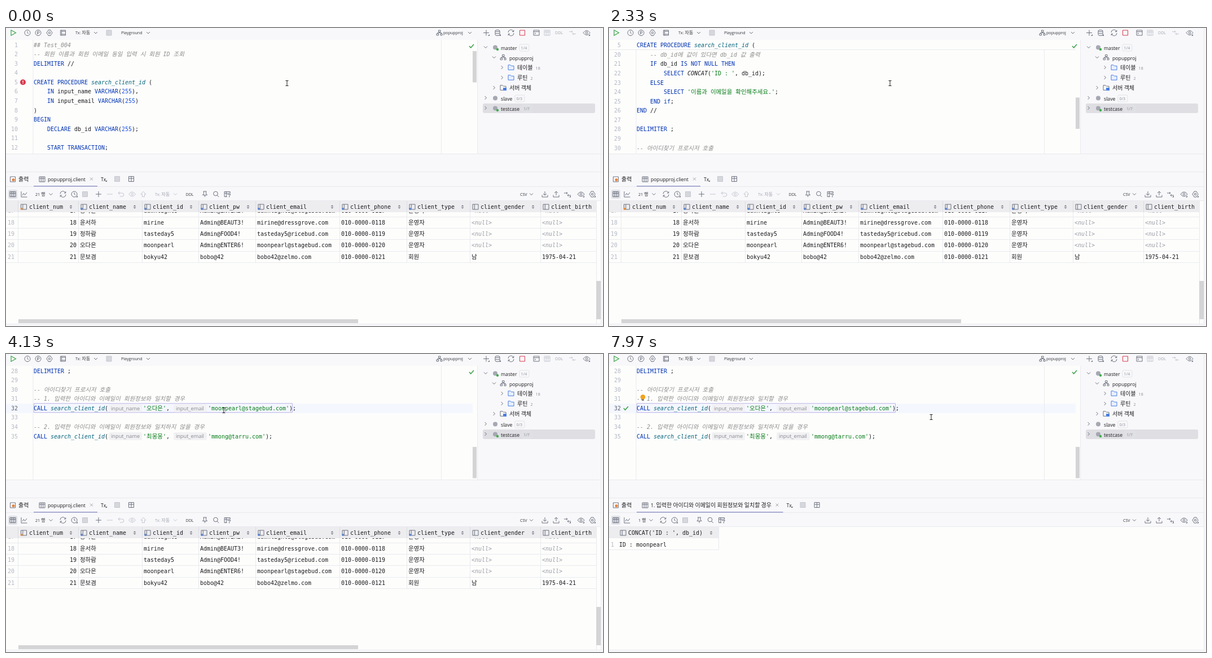
An HTML page with a canvas for the animation above (8 s loop, 1058 by 529 pixels).

```html
<!DOCTYPE html>
<html lang="ko">
<head>
<meta charset="utf-8">
<style>
html, body { margin: 0; width: 100%; height: 100%; overflow: hidden; background: #fdfdfc; }
canvas { display: block; }
</style>
</head>
<body>
<canvas id="stage" width="1058" height="529"></canvas>
<script>
const ctx = document.getElementById('stage').getContext('2d');
const LOOP = 8000, LINE = 16.57, CLICK = 4400, BULB = 5000, POPUP = [5800, 6850], RESULT = 7000;
const WHITE = '#fdfdfc', PANEL = '#f8f8fa', RULE = '#e9eaee', INK = '#1c1c20', GREY = '#6c707e', PALE = '#c4c7d0';
const THUMB = '#d4d4d6', GREEN = '#3fa34d', MONO = '"DejaVu Sans Mono", monospace', UI = '"Open Sans", sans-serif';

const code = `## Test_004
-- 회원 이름과 회원 이메일 동일 입력 시 회원 ID 조회
DELIMITER //

CREATE PROCEDURE search_client_id (
    IN input_name VARCHAR(255),
    IN input_email VARCHAR(255)
)
BEGIN
    DECLARE db_id VARCHAR(255);

    START TRANSACTION;

    -- 입력받은 이름과 이메일이 회원정보와 같을 경우 db_id에 client_id 값 저장
    SELECT client_id
    INTO db_id
    FROM client
    WHERE client_name = input_name AND client_email = input_email;

    -- db_id에 값이 있다면 db_id 값 출력
    IF db_id IS NOT NULL THEN
        SELECT CONCAT('ID : ', db_id);
    ELSE
        SELECT '이름과 이메일을 확인해주세요.';
    END if;
END //

DELIMITER ;

-- 아이디찾기 프로시저 호출
-- 1. 입력한 아이디와 이메일이 회원정보와 일치할 경우
CALL search_client_id({input_name}'오다은', {input_email}'moonpearl@stagebud.com');

-- 2. 입력한 아이디와 이메일이 회원정보와 일치하지 않을 경우
CALL search_client_id({input_name}'최몽몽', {input_email}'mmong@tarru.com');`.split('\n');

const columns = [[21, 'client_num'], [128, 'client_name'], [241, 'client_id'], [341, 'client_pw'], [442, 'client_email'],
  [591, 'client_phone'], [710, 'client_type'], [822, 'client_gender'], [947, 'client_birth']];
const rows = [
  ['17', '송가온', 'dawnlights', 'Admin@ENTER2!', 'dawnlights@stagebud.com', '010-0000-0117', '운영자', '<null>', '<null>'],
  ['18', '윤서하', 'mirine', 'Admin@BEAUT3!', 'mirine@dressgrove.com', '010-0000-0118', '운영자', '<null>', '<null>'],
  ['19', '정하람', 'tasteday5', 'Admin@FOOD4!', 'tasteday5@ricebud.com', '010-0000-0119', '운영자', '<null>', '<null>'],
  ['20', '오다은', 'moonpearl', 'Admin@ENTER6!', 'moonpearl@stagebud.com', '010-0000-0120', '운영자', '<null>', '<null>'],
  ['21', '문보겸', 'bokyu42', 'bobo@42', 'bobo42@zelmo.com', '010-0000-0121', '회원', '남', '1975-04-21']];

const ring = r => `M${r} 0A${r} ${r} 0 1 1-${r} 0A${r} ${r} 0 1 1 ${r} 0`;
const shapes = {
  play: 'M-4-4.8L4.5 0L-4 4.8Z',
  clock: ring(5) + 'M0-3V0L2 1.5',
  param: ring(5) + 'M-1.3 2.8V-2.5H.5A1.5 1.5 0 0 1 .5.6H-1.3',
  gear: 'M-2-5H2L3-3L5.2 0L3 3L2 5H-2L-3 3L-5.2 0L-3-3Z' + ring(1.7),
  frame: 'M-4.5-4.5H4.5V4.5H-4.5ZM-2.5-4.5V4.5M-2.5-2.5H4.5M-2.5 2.5H4.5',
  layout: 'M-4.5-4.5H4.5V4.5H-4.5ZM0-4.5V4.5M-4.5-1H4.5',
  table: 'M-5-4.5H5V4.5H-5ZM-5-1.5H5M-1.7-4.5V4.5M1.7-4.5V4.5',
  column: 'M-5-4.5H5V4.5H-5ZM-1.7-4.5V4.5',
  refresh: 'M-5-.5A4.7 4.7 0 0 1 4-2.5M4.8-4.8V-2H2M5 .5A4.7 4.7 0 0 1-4 2.5M-4.8 4.8V2H-2',
  down: 'M-3-1.5L0 1.5L3-1.5',
  right: 'M-1.5-3L1.5 0L-1.5 3',
  plus: 'M-5 0H5M0-5V5',
  minus: 'M-5 0H5',
  undo: 'M-2-4.5L-5-2L-2 .5M-5-2H2A2.8 2.8 0 0 1 2 4H-2',
  eye: 'M-6 0Q0-8 6 0Q0 8-6 0' + ring(1.8),
  up: 'M0-4.8L4.5 0H2V4.5H-2V0H-4.5Z',
  pin: 'M-3-5H3M-2-5V-1L-4 1.5H4L2-1V-5M0 1.5V5',
  search: 'M3-1A3.8 3.8 0 1 1-4.6-1A3.8 3.8 0 1 1 3-1M2 2L5 5',
  filter: 'M5-1V-4.5H-5V4.5H-.5M-5-1.7H5M-1.7-4.5V4.5M0 .5H6L3.7 2.8V5.5',
  load: 'M0-5V2M-3-1L0 2L3-1M-5 1.5V5H5V1.5',
  save: 'M0 2V-5M-3-2L0-5L3-2M-5 1.5V5H5V1.5',
  compare: 'M-6-2H0M-2-4L0-2L-2 0M6 2H0M2 0L0 2L2 4',
  db: 'M-4-3.5A4 1.5 0 0 1 4-3.5A4 1.5 0 0 1-4-3.5V3.5A4 1.5 0 0 0 4 3.5V-3.5M-4 0A4 1.5 0 0 0 4 0',
  console: 'M-5-4.5H5V4.5H-5ZM-5-2H5M-3 0L-1.5 1.2L-3 2.5',
  folder: 'M-5-4.3H-1L.5-2.7H5V4.3H-5Z',
  schema: 'M-1.5-4.5H2V-1.5H-1.5ZM-5 1.5H-1.5V4.5H-5ZM2 1.5H5V4.5H2ZM.3-1.5V0M-3.2 1.5V0H3.5V1.5',
  chart: 'M-5-5V5H5.5M-3 2L-.7-1.5L1.5 1.5L5-3',
  square: 'M-4.5-4.5H4.5V4.5H-4.5Z',
  sort: 'M-2-1L0-3L2-1ZM-2 1L0 3L2 1Z',
  check: 'M-4 0L-1.3 3L4-3',
  close: 'M-2.5-2.5L2.5 2.5M2.5-2.5L-2.5 2.5',
  corner: 'M3 5.5H6V2.5Z',
  beam: 'M-2.5-4.5H2.5M0-4.5V4.5M-2.5 4.5H2.5'
};
for (const k in shapes) shapes[k] = new Path2D(shapes[k]);

function icon(name, x, y, color = GREY, fill, width = 1) {
  ctx.save();
  ctx.translate(x, y);
  if (fill) { ctx.fillStyle = fill; ctx.fill(shapes[name]); }
  ctx.strokeStyle = color;
  ctx.lineWidth = width;
  ctx.stroke(shapes[name]);
  ctx.restore();
}
const corner = (x, y) => { ctx.save(); ctx.translate(x, y); ctx.fillStyle = GREY; ctx.fill(shapes.corner); ctx.restore(); };
function rect(x, y, w, h, color) { ctx.fillStyle = color; ctx.fillRect(x, y, w, h); }
function dot(x, y, r, color) { ctx.fillStyle = color; ctx.beginPath(); ctx.arc(x, y, r, 0, 7); ctx.fill(); }
function round(x, y, w, h, r, fill, stroke) {
  ctx.beginPath();
  ctx.roundRect(x, y, w, h, r);
  if (fill) { ctx.fillStyle = fill; ctx.fill(); }
  if (stroke) { ctx.strokeStyle = stroke; ctx.lineWidth = 1; ctx.stroke(); }
}
// Draws text centred on y and returns its right end; Hangul runs a little larger.
function write(s, x, y, color, size, family, hangul, style) {
  ctx.fillStyle = color;
  for (const run of s.match(/[가-힣]+|[^가-힣]+/g) || []) {
    ctx.font = /[가-힣]/.test(run)
      ? `${style} ${size * hangul}px "Noto Sans CJK KR", "Noto Sans CJK", sans-serif`
      : `${style} ${size}px ${family}`;
    ctx.fillText(run, x, y + size * .36);
    x += ctx.measureText(run).width;
  }
  return x;
}
const mono = (s, x, y, color = INK, style = '') => write(s, x, y, color, 9.97, MONO, 1.05, style);
const label = (s, x, y, color = INK, size = 8.7) => write(s, x, y, color, size, UI, 1.15, '');
const small = (s, x, y, color = '#33353c') => label(s, x, y, color, 7.1);

const KEYWORD = /^([A-Z]+|if)$/;
function codeLine(n, y, sticky) {
  const num = String(n);
  mono(num, 21 - num.length * 6, y, n == 32 ? '#5b5f6e' : '#b4b8c5');
  if (n == 5 && !sticky) {
    dot(30, y, 5, '#d8394c');
    rect(29.4, y - 3, 1.3, 3.6, '#fff');
    rect(29.4, y + 1.6, 1.3, 1.3, '#fff');
  }
  let x = 49;
  for (const token of code[n - 1].match(/--.*|##.*|'[^']*'|\{\w+\}|\w+|\s+|./g) || []) {
    if (token[0] == '{') {
      round(x + 1, y - 7, 59, 14, 3, '#f2f2f4');
      label(token.slice(1, -1), x + 5, y, '#85878f', 9.2);
      x += 62;
    } else if (/^(--.|##)/.test(token)) x = mono(token, x, y, '#8c8c8c', 'italic');
    else if (token[0] == "'") x = mono(token, x, y, '#067d17');
    else if (token == 'search_client_id') x = mono(token, x, y, '#00627a', 'italic');
    else if (token == 'CONCAT') x = mono(token, x, y, INK, 'italic');
    else if (KEYWORD.test(token)) x = mono(token, x, y, '#0033b3');
    else if (/^\d/.test(token)) x = mono(token, x, y, '#1750eb');
    else x = mono(token, x, y, /^client_/.test(token) ? '#871094' : INK);
  }
}

const clamp = v => Math.max(0, Math.min(1, v));
// Wheel notches of three lines, each eased over 200 ms.
const notches = [560, 840, 1120, 1462, 1740, 2155, 2400, 2580, 2760];
const scrollAt = t => notches.reduce((sum, n) => sum + 3 * LINE * (1 - (1 - clamp((t - n) / 200)) ** 2), 0);

const pointer = [[0, 498, 98], [2900, 498, 98], [3070, 495, 99], [3300, 495, 99], [3950, 386, 100],
  [4700, 386, 100], [5300, 574, 102], [6200, 574, 102], [6700, 571, 112], [LOOP, 571, 112]];
function pointerAt(t) {
  const i = pointer.findIndex(p => p[0] > t);
  const [t0, x0, y0] = pointer[i - 1], [t1, x1, y1] = pointer[i];
  const k = (t - t0) / (t1 - t0), e = k * k * (3 - 2 * k);
  return [x0 + (x1 - x0) * e, y0 + (y1 - y0) * e];
}

function editor(t) {
  const scroll = scrollAt(t), lineY = n => 30 + (n - 1) * LINE - scroll;
  ctx.save();
  ctx.beginPath();
  ctx.rect(0, 21, 835, 202);
  ctx.clip();
  rect(0, 21, 835, 202, WHITE);
  const y32 = lineY(32);
  rect(0, y32 - 8, 827, 16.5, '#f4f7fe');
  rect(47.5, 21, 1, 202, RULE);
  rect(771, 21, 1, 202, RULE);
  round(49.5, y32 - 8.5, 458, 16, 0, null, '#b9b2e8');
  code.forEach((_, i) => {
    const y = lineY(i + 1);
    if (y > 10 && y < 235) codeLine(i + 1, y);
  });
  if (t > BULB) {
    dot(60, y32 - 20, 4.3, '#f2a31b');
    rect(58, y32 - 16, 4, 2.5, '#7c7468');
  }
  if (t > RESULT) icon('check', 30, y32, GREEN, null, 1.7);
  if (t > CLICK && (t - CLICK) % 1000 < 500) rect(386.5, y32 - 7, 1.5, 14, '#000');
  if (lineY(5) < 30 && lineY(26) > 30) {
    rect(0, 21, 827, 17, WHITE);
    rect(0, 38, 827, 1, RULE);
    codeLine(5, 30, true);
  }
  rect(827, 41 + scroll * .277, 7, 55.5, THUMB);
  icon('check', 825, 32, GREEN, null, 1.6);
  ctx.restore();
}

function topBar() {
  const y = 8.5;
  icon('play', 13, y, GREEN, '#f0faf1', 1.2);
  icon('clock', 38, y);
  icon('param', 57, y);
  icon('gear', 77, y);
  icon('frame', 101, y);
  small('Tx: 자동', 123, y);
  icon('down', 159, y);
  icon('square', 182.5, y, PALE, '#d6d7dc');
  small('Playground', 204, y);
  icon('down', 252, y);
  icon('schema', 768, y);
  small('popupproj', 775, y);
  icon('down', 822, y);
  for (const [name, x, color] of [['plus', 851], ['db', 871], ['refresh', 895], ['square', 915, '#d8394c'],
    ['console', 940], ['table', 959, PALE], ['compare', 1004, PALE], ['eye', 1029]]) icon(name, x, y, color);
  small('DDL', 973, y, '#a0a3ad');
  [851, 871, 1029].forEach(x => corner(x, y));
}

function tree() {
  rect(835, 21, 1, 202, RULE);
  round(845, 134, 199, 17, 3, '#dfdfe3');
  const server = (name, y, count, arrow, live) => {
    icon(arrow, 850, y - 1);
    dot(867, y - .5, 4, '#a5a8b2');
    if (live) dot(871, y + 3, 2.2, '#3fae4c');
    const end = label(name, 877, y + .5);
    round(end + 4.5, y - 6, 17, 12, 2, null, '#e2e4e9');
    small(count, end + 7, y, '#8c8f9a');
  };
  server('master', 35, '1/4', 'down', true);
  icon('down', 865, 52);
  icon('schema', 881, 52);
  label('popupproj', 892, 53.5);
  [['테이블', 71, '18'], ['루틴', 89, '2']].forEach(([name, y, count]) => {
    icon('right', 879, y - 1);
    icon('folder', 895, y - 1, '#4a7fe0', '#e7effd');
    small(count, label(name, 906, y) + 5, y + .5, '#8c8f9a');
  });
  icon('right', 865, 106);
  icon('folder', 881, 106);
  rect(881, 106, 6, 5, '#4a7fe0');
  label('서버 객체', 892, 107);
  server('slave', 125, '0/3', 'right', false);
  server('testcase', 143, '1/7', 'right', true);
}

function tabs(done) {
  const y = 268.5, shift = done ? 146.5 : 0;
  icon('square', 12, y, GREY, '#fff');
  dot(13, y + 1, 2.5, '#e8823a');
  label('출력', 22, y);
  icon('table', 64, y);
  label(done ? '1. 입력한 아이디와 이메일이 회원정보와 일치할 경우' : 'popupproj.client', 74, y + .5);
  icon('close', 151.5 + shift, y - .5, '#a3a6b0');
  label('Tx', 168 + shift, y);
  corner(173 + shift, y - 1);
  icon('square', 197 + shift, y - .5, PALE, '#d6d7dc');
  icon('layout', 222 + shift, y - .5);
  rect(0, 281, 1055, 1, RULE);
  rect(49, 280, 113 + shift, 1.5, '#9297c9');
}

function gridBar(done) {
  const y = 295, back = done ? 5 : 0, tail = done ? 192.5 : 0;
  round(4, 287, 16, 16, 3, '#dfe1e6');
  icon('table', 12, y);
  icon('chart', 32, y);
  small(done ? '1 행' : '21 행', 52, y);
  icon('down', 79.5 - back, y);
  icon('refresh', 101 - back, y);
  icon('clock', 121 - back, y);
  corner(121 - back, y);
  icon('square', 140 - back, y, PALE, '#d6d7dc');
  if (!done) {
    icon('plus', 164, y);
    ['minus', 'undo', 'eye', 'up'].forEach((name, i) => icon(name, 184 + i * 19.8, y, PALE));
    small('Tx: 자동', 264, y, '#a0a3ad');
    icon('down', 300, y, PALE);
    small('DDL', 318.5, y);
  }
  ['pin', 'search', 'filter'].forEach((name, i) => icon(name, 352.5 - tail + i * 19.8, y));
  small('CSV', 911, y);
  icon('down', 931, y);
  [['load', 955], ['save', 975], ['compare', 995], ['eye', 1019], ['gear', 1039]].forEach(([name, x]) => icon(name, x, y));
  [995, 1019, 1039].forEach(x => corner(x, y));
}

function clientGrid() {
  rows.forEach((row, i) => {
    const y = 324.6 + i * 20.35;
    rect(0, Math.round(y + 10), 1046, 1, RULE);
    mono(row[0], 3, y, '#b4b8c5');
    row.forEach((cell, c) => {
      const empty = cell == '<null>';
      mono(cell, c ? columns[c][0] + 3 : 113, y, empty ? '#9a9ca5' : INK, empty ? 'italic' : '');
    });
  });
  columns.forEach(([x]) => rect(x, 327, 1, 89, RULE));
  rect(0, 307, 1046, 20, '#ededf0');
  columns.forEach(([x, name], i) => {
    rect(x, 307, 1, 20, '#dcdde2');
    const ix = x + (i ? 10 : 10.5);
    icon('column', ix, 317.5);
    if (i < 7) dot(ix - 4, 321, 2, i ? '#5b84d6' : '#e8913a');
    mono(name, x + (i ? 19 : 20), 317.5);
    if (i < 8) icon('sort', columns[i + 1][0] - 13, 317.5, GREY, GREY, .3);
  });
  rect(1046, 307, 1, 218, RULE);
  rect(1046, 449, 8, 68, THUMB);
  rect(22, 517, 602, 7, THUMB);
}

function resultGrid() {
  rect(0, 307, 194, 20, '#ededf0');
  icon('column', 25, 317.5);
  mono("CONCAT('ID : ', db_id)", 34, 317.5);
  icon('sort', 181, 317.5, GREY, GREY, .3);
  mono('1', 3, 338, '#b4b8c5');
  mono('ID : moonpearl', 18, 338);
  rect(0, 347, 195, 1, RULE);
  rect(194, 307, 1, 41, RULE);
}

// The shadow lies outside the box only, so the code inside stays visible.
function popup() {
  const box = [387.5, 105.5, 318, 84, 4];
  ctx.save();
  ctx.beginPath();
  ctx.rect(0, 0, 1058, 529);
  ctx.roundRect(...box);
  ctx.clip('evenodd');
  ctx.shadowColor = 'rgba(0,0,0,.22)';
  ctx.shadowBlur = 34;
  ctx.shadowOffsetY = 16;
  round(...box, WHITE);
  ctx.restore();
  round(...box, null, '#b6b7c9');
}

function draw(now) {
  const t = now % LOOP, done = t > RESULT;
  rect(0, 0, 1058, 529, PANEL);
  rect(0, 307, 1054, 218, WHITE);
  topBar();
  editor(t);
  tree();
  rect(0, 223, 1055, 1, RULE);
  rect(0, 255, 1055, 1, RULE);
  tabs(done);
  gridBar(done);
  rect(0, 306, 1055, 1, RULE);
  done ? resultGrid() : clientGrid();
  rect(0, 525, 1055, 1, RULE);
  rect(1054, 0, 1, 525, RULE);
  if (t > POPUP[0] && t < POPUP[1]) popup();
  icon('beam', ...pointerAt(t), '#222');
  requestAnimationFrame(draw);
}
requestAnimationFrame(draw);
</script>
</body>
</html>
```
